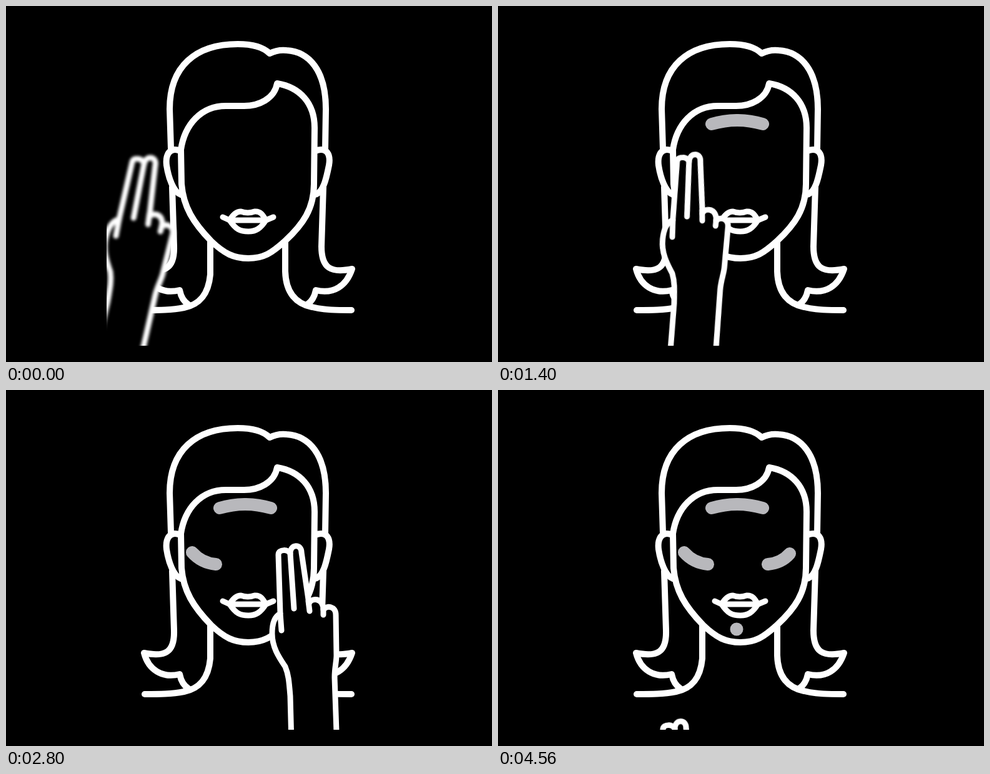
An HTML page that plays this animation: 778 by 570 pixels, repeating every 4640 ms.

```html
<!DOCTYPE html>
<html lang="en">
<head>
<meta charset="utf-8">
<title>Face care gesture</title>
<style>
  html, body { margin: 0; width: 100%; height: 100%; overflow: hidden; background: #000; }
  svg { display: block; width: 778px; height: 570px; }
  path { fill: none; stroke: #fff; stroke-linecap: round; stroke-linejoin: round; }
  .face { stroke-width: 10; }
  .lips { stroke-width: 9; }
  .mark { stroke: #b8b8bc; stroke-width: 20; stroke-dasharray: 1 2; }
  .skin { fill: #000; }
  .hand path { stroke-width: 9; }

  .hand, .mark, .dot { animation: 4640ms linear infinite; }
  .hand { animation-name: hand, haze; }
  .brow { animation-name: brow; }
  .left { animation-name: left; }
  .right { animation-name: right; }
  .dot { fill: #b8b8bc; animation-name: dot; }

  /* Origin of the hand is the notch between the two fingertips. */
  @keyframes hand {
    0% { transform: translate(221px, 251px) rotate(14.8deg); animation-timing-function: cubic-bezier(.3, .4, .6, 1); }
    8.62%, 10.34% { transform: translate(357px, 181px) rotate(12.9deg); animation-timing-function: cubic-bezier(.36, 0, .68, .5); }
    16.38% { transform: translate(396px, 174px) rotate(6deg); animation-timing-function: cubic-bezier(.32, .5, .64, 1); }
    22.41%, 24.14% { transform: translate(435px, 180px) rotate(0deg); animation-timing-function: ease-in-out; }
    30.17%, 31.9% { transform: translate(306px, 247px) rotate(6deg); animation-timing-function: ease-in-out; }
    45.69%, 47.41% { transform: translate(347px, 268px) rotate(.7deg); animation-timing-function: ease-in-out; }
    60.34%, 62.07% { transform: translate(455px, 260px) rotate(0deg); animation-timing-function: ease-in-out; }
    72.41%, 73.71% { transform: translate(424px, 275px) rotate(8deg); animation-timing-function: ease-in-out; }
    82.76%, 85.34% { transform: translate(390px, 376px) rotate(13.5deg); }
    100% { transform: translate(269px, 562px) rotate(.5deg); }
  }
  /* Soft edges while the hand sweeps in. */
  @keyframes haze {
    0% { filter: blur(2px); }
    8.62%, 100% { filter: blur(0); }
  }
  @keyframes brow {
    0%, 10.33% { opacity: 0; stroke-dashoffset: 1; }
    10.34% { opacity: 1; stroke-dashoffset: 1; animation-timing-function: ease-in-out; }
    22.41%, 100% { opacity: 1; stroke-dashoffset: 0; }
  }
  @keyframes left {
    0%, 31.89% { opacity: 0; stroke-dashoffset: 1; }
    31.9% { opacity: 1; stroke-dashoffset: 1; animation-timing-function: ease-in-out; }
    45.69%, 100% { opacity: 1; stroke-dashoffset: 0; }
  }
  @keyframes right {
    0%, 62.06% { opacity: 0; stroke-dashoffset: 1; }
    62.07% { opacity: 1; stroke-dashoffset: 1; animation-timing-function: ease-in-out; }
    72.41%, 100% { opacity: 1; stroke-dashoffset: 0; }
  }
  @keyframes dot {
    0%, 83.6% { opacity: 0; }
    83.61%, 100% { opacity: 1; }
  }
</style>
</head>
<body>
<svg viewBox="0 0 778 570">
  <clipPath id="stage"><rect x="161" y="0" width="399" height="544"/></clipPath>

  <g>
    <!-- hair -->
    <path class="face" d="M264 228L262 165C262 97 303 61 371 61C395 61 412 66 422 76C432 71 440 70 449 71C485 73 512 103 512 165L511 228"/>
    <path class="face" d="M266 290L269 385C270 420 255 428 221 421C228 448 250 462 278 455C280 465 284 473 292 478"/>
    <path class="face" d="M508 290L505 385C505 420 520 428 554 421C545 448 525 462 496 455C494 465 490 473 482 478"/>
    <!-- face -->
    <path class="face" d="M434 124C430 148 405 161 378 160H352C312 160 286 190 280 230L281 285C284 322 300 347 328 376C350 397 365 404 388 404C412 404 425 396 447 376C475 350 493 325 493 285L494 195C494 155 470 130 434 124"/>
    <!-- ears -->
    <path class="face" d="M279 232C262 225 255 238 257 255C260 275 268 298 280 302"/>
    <path class="face" d="M495 232C514 225 520 238 517 255C513 275 508 300 494 302"/>
    <!-- neck -->
    <path class="face" d="M327 378V430C324 462 310 478 285 483C265 487 245 487 222 487"/>
    <path class="face" d="M447 378V425C448 460 465 477 490 482C510 487 530 487 553 487"/>
    <!-- lips -->
    <path class="lips" d="M347 338L358 343C365 331 371 329 376 329Q387 333 398 329C407 328 411 334 416 343L428 338"/>
    <path class="lips" d="M358 343C368 358 375 361 388 361C400 361 408 356 416 343H358"/>
  </g>

  <path class="mark brow" pathLength="1" d="M342 189Q383 177 424 189"/>
  <path class="mark left" pathLength="1" d="M298 260Q313 277 336 279"/>
  <path class="mark right" pathLength="1" d="M467 262Q454 277 432 279"/>
  <circle class="dot" cx="382" cy="383" r="10.5"/>

  <g clip-path="url(#stage)">
    <g class="hand">
      <path class="skin" d="M2 306L0 230C-2 205 -3 195 -8 183C-18 168 -29 152 -29 130C-29 112 -24 102 -16 98L-19 4C-19 -6 -2 -5 0 2C0 -14 18 -14 18 0L30 82C33 72 53 72 53 92C58 84 73 86 73 100L74 165C74 175 71 185 71 200L75 317"/>
      <path d="M-16 98L-14 125M0 2L6 90M29 78L31 94M53 90V100"/>
    </g>
  </g>
</svg>
</body>
</html>
```
